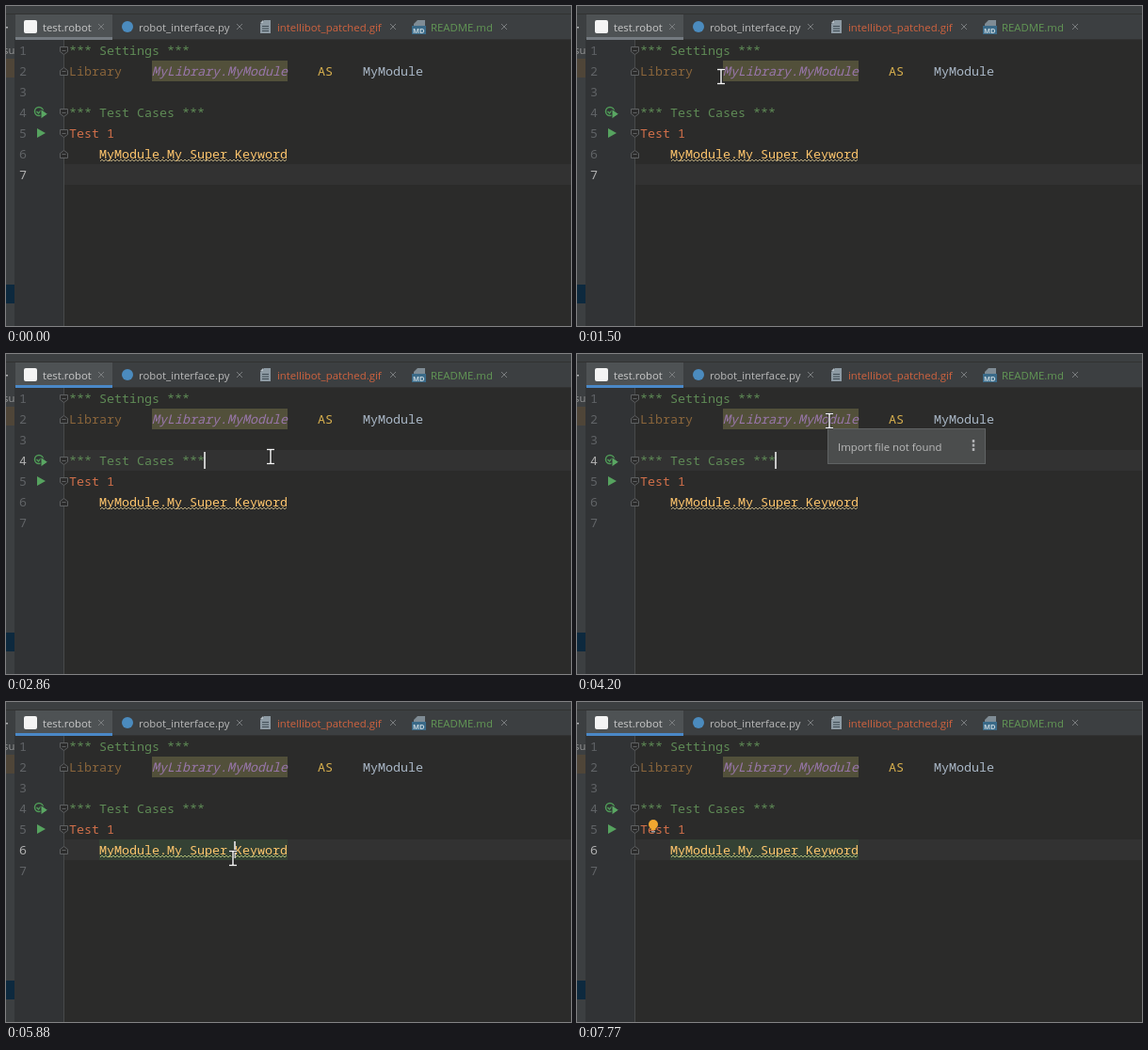
An HTML page that plays this animation: 600 by 340 pixels, repeating every 8.27 s.

```html
<!DOCTYPE html>
<html lang="en">
<head>
<meta charset="utf-8">
<title>Editor session</title>
<style>
  html, body { margin: 0; width: 100%; height: 100%; overflow: hidden; background: #2b2b2b; }
  svg { display: block; width: 600px; height: 340px; }
  text { white-space: pre; }
  .code { font: 13.333px "Noto Sans Mono", monospace; }
  .italic { font-style: italic; }
  .ui { font: 11.35px "Open Sans", sans-serif; fill: #bbbbbb; }
  .line { fill: none; }
</style>
</head>
<body>
<svg id="stage" viewBox="0 0 600 340">
  <rect width="600" height="340" fill="#2b2b2a"/>
  <rect x="9" y="36" width="52" height="304" fill="#313335"/>
  <rect id="row" x="62" width="538" height="22" fill="#323232"/>

  <!-- side panel and tab bar -->
  <rect width="600" height="36" fill="#3c3f41"/>
  <rect y="36" width="9" height="304" fill="#3c3f41"/>
  <rect y="8" width="600" height="1" fill="#323232"/>
  <rect x="9" y="35" width="591" height="1" fill="#323232"/>
  <rect y="56" width="9" height="20" fill="#4f4538"/>
  <rect y="296" width="9" height="20" fill="#0d293e"/>
  <text class="ui" x="-3" y="51" fill-opacity=".7">su</text>
  <rect y="22" width="2" height="1.5" fill="#afb1b3"/>
  <rect x="10" y="9" width="103" height="27" fill="#4e5254"/>
  <rect id="underline" x="10" y="33" width="103" height="3"/>
  <rect x="19" y="15" width="14" height="14" rx="2" fill="#f4f4f4"/>
  <circle cx="129" cy="22" r="6" fill="#4b8bbe"/>
  <g>
    <path d="M274 15h7v14h-11v-10z" fill="#8d9aa3"/>
    <path d="M270 18l3-3v3z" fill="#b4bec5"/>
    <path d="M272 21.500h7M272 24h7M272 26.500h7" stroke="#3f4c55"/>
  </g>
  <g>
    <path d="M437 15h8v14h-12v-10z" fill="#7f8c95"/>
    <rect x="431" y="21" width="15" height="9" fill="#3a6a88"/>
    <text x="432" y="28.500" font-family="Open Sans, sans-serif" font-size="7.500" font-weight="700" fill="#c3d3dc">MD</text>
  </g>
  <g id="tabs"></g>

  <!-- gutter -->
  <path d="M61.500 36V340" stroke="#484a4b"/>
  <g id="gutter"></g>
  <g id="folds" fill="#2b2b2b" stroke="#5f6162"></g>
  <circle cx="35" cy="112" r="4.500" class="line" stroke="#4f9a57" stroke-width="1.500"/>
  <path d="M32.500 112l2 2 3.500-4" class="line" stroke="#4f9a57" stroke-width="1.500"/>
  <path d="M37 109.500v10.500l7.500-5.250z" fill="#5aa763" stroke="#313335"/>
  <path d="M33 130v10l9-5z" fill="#56a35f"/>

  <!-- code -->
  <rect x="155" y="58" width="144" height="22" fill="#52503a"/>
  <rect id="mark" x="99" y="146" width="200" height="22" fill="#344134"/>
  <g id="code"></g>
  <path id="wave" class="line"/>
  <rect id="caret" width="2" height="18" fill="#c8c8c8"/>

  <g id="bulb">
    <circle cx="81" cy="130" r="5" fill="#f2a830"/>
    <rect x="78.500" y="134" width="5" height="2" fill="#f2a830"/>
    <rect x="79" y="137" width="4" height="1.500" fill="#9da0a2"/>
  </g>

  <g id="tip">
    <rect x="266.500" y="79.500" width="167" height="37" fill="#4b4d4d" stroke="#606364"/>
    <text class="ui" x="277" y="103">Import file not found</text>
    <path d="M421 91v3M421 95.500v3M421 100v3" stroke="#afb1b3" stroke-width="2.500"/>
  </g>

  <g id="balloon">
    <path d="M121.500 91.500h243q4 0 4 4v36q0 4-4 4H252l-9 10-9-10H121.500q-4 0-4-4v-36q0-4 4-4z" fill="#4b4d4f" stroke="#646768"/>
    <text class="ui" x="128" y="109.500" style="font-size:11.500px">No usages found in All Places</text>
    <text class="ui" x="128" y="124" style="font-size:9.400px">Press Ctrl+Alt+F7 again to search in 'Project Files'</text>
    <path d="M345 117.500l6-6" stroke="#b4b6b8" stroke-width="3" stroke-linecap="round"/>
    <path d="M355.500 107.500a3.600 3.600 0 1 1-3-2.500" class="line" stroke="#b4b6b8" stroke-width="2.800"/>
  </g>

  <g id="pointer" class="line">
    <path id="halo" stroke="#111" stroke-width="2.800"/>
    <path id="beam" stroke="#f4f4f4" stroke-width="1.500"/>
  </g>
</svg>
<script>
const LOOP = 8270;
const TICKS = 49;   // screen updates per loop
const LEAD = 28;    // the updates run slightly ahead of an even clock
const BLINK = 3;    // ticks per caret phase
const $ = id => document.getElementById(id);
const lineTop = n => 14 + 22 * n;
const column = n => 67 + 8 * n;
const clamp = v => Math.max(0, Math.min(1, v));
const ease = u => u * u * (3 - 2 * u);

function add(parent, tag, attrs, text = "") {
  const el = document.createElementNS("http://www.w3.org/2000/svg", tag);
  for (const key in attrs) el.setAttribute(key, attrs[key]);
  el.textContent = text;
  $(parent).append(el);
  return el;
}

function set(id, attrs) {
  for (const key in attrs) $(id).setAttribute(key, attrs[key]);
}

function addTab(label, x, close, fill) {
  add("tabs", "text", { x, y: 26.5, class: "ui", style: `fill:${fill}` }, label);
  add("tabs", "path", { d: `M${close - 3} 19l6 6m0-6l-6 6`, stroke: "#7a7d7f" });
}
addTab("test.robot", 39, 101, "#c8c8c8");
addTab("robot_interface.py", 141, 248, "#bbbbbb");
addTab("intellibot_patched.gif", 288, 411, "#d0633f");
addTab("README.md", 451, 529, "#629755");

function addCode(line, col, text, fill, style = "") {
  add("code", "text", { x: column(col), y: lineTop(line) + 16, class: `code ${style}`, fill }, text);
}
addCode(1, 0, "*** Settings ***", "#5f8b56");
addCode(2, 0, "Library", "#8a653b");
addCode(2, 11, "MyLibrary.MyModule", "#9876aa", "italic");
addCode(2, 33, "AS", "#d8b04e");
addCode(2, 39, "MyModule", "#a9b7c6");
addCode(4, 0, "*** Test Cases ***", "#5f8b56");
addCode(5, 0, "Test 1", "#d2704a");
addCode(6, 4, "MyModule.My Super Keyword", "#ffc66d");

const numbers = [];
for (let n = 1; n <= 7; n++) {
  numbers[n] = add("gutter", "text", { x: 14, y: lineTop(n) + 16, class: "code" }, n);
}

// Fold markers point down at the start of a block and up at its end.
function addFold(line, dir) {
  const y = lineTop(line) + 11.5;
  add("folds", "path", {
    d: `M57.500 ${y - 4 * dir}h8v${5 * dir}l-4 ${3 * dir}l-4 ${-3 * dir}zM59.500 ${y}h4`
  });
}
[1, 4, 5].forEach(line => addFold(line, 1));
[2, 6].forEach(line => addFold(line, -1));

set("wave", { d: "M100 165" + "l2 -2l2 2".repeat(49) + "l2 -2" });
const beam = "M-4-7.500H4M0-7.500V7.500M-4 7.500H4";
set("halo", { d: beam });
set("beam", { d: beam });

// Pointer stops; it eases from one to the next.
const stops = [
  { k: 1, x: 505, y: 288 },
  { k: 6, x: 157, y: 77 },
  { k: 9, x: 153, y: 75 },
  { k: 14, x: 437, y: 66 },
  { k: 17, x: 281, y: 109 },
  { k: 19, x: 268, y: 71 },
  { k: 28, x: 268, y: 71 },
  { k: 30, x: 257, y: 122 },
  { k: 34, x: 243, y: 178 },
  { k: 35, x: 241, y: 166 },
  { k: 42, x: 241, y: 166 },
  { k: 45, x: 391, y: 267 }
];
const FOCUS = 14;
const clicks = [
  { k: 0, line: 7, col: 0 },
  { k: FOCUS, line: 2, col: 46 },
  { k: 16, line: 4, col: 18 },
  { k: 33, line: 6, col: 22 }
];

function pointerAt(k) {
  const i = Math.max(1, stops.findIndex(s => s.k >= k));
  const a = stops[i - 1], b = stops[i];
  const u = ease(clamp((k - a.k) / (b.k - a.k)));
  return [a.x + (b.x - a.x) * u, a.y + (b.y - a.y) * u];
}

// Two-tick fade in from start, two-tick fade out up to end
const fade = (k, start, end) => clamp(Math.min(k - start + 1, end - k) / 2);

function draw(t) {
  const k = Math.floor((t + LEAD) / LOOP * TICKS) % TICKS;
  const click = clicks.filter(c => c.k <= k).pop();
  const focused = k >= FOCUS;
  const lit = (k + 5) % (2 * BLINK) < BLINK || k - click.k < BLINK;
  const searched = k >= 35;

  set("underline", { fill: focused ? "#4a88c7" : "#747a80" });
  set("row", { y: lineTop(click.line) });
  numbers.forEach((el, n) => el.setAttribute("fill", n === click.line ? "#b0b0b0" : "#606366"));
  set("caret", {
    x: column(click.col) - 1, y: lineTop(click.line) + 2, opacity: +(focused && lit)
  });
  set("mark", { opacity: +searched });
  set("wave", { stroke: searched ? "#a9b873" : "#b5a57a" });
  set("tip", { opacity: fade(k, 22, 29) });
  set("balloon", { opacity: fade(k, 36, 45) });
  set("bulb", { opacity: +(k >= 41) });

  const shown = k >= 1 && k <= 45;
  set("pointer", { opacity: +shown });
  if (shown) set("pointer", { transform: `translate(${pointerAt(k).map(Math.round).join(" ")})` });
}

function tick() {
  draw(performance.now() % LOOP);
  requestAnimationFrame(tick);
}
tick();
</script>
</body>
</html>
```
